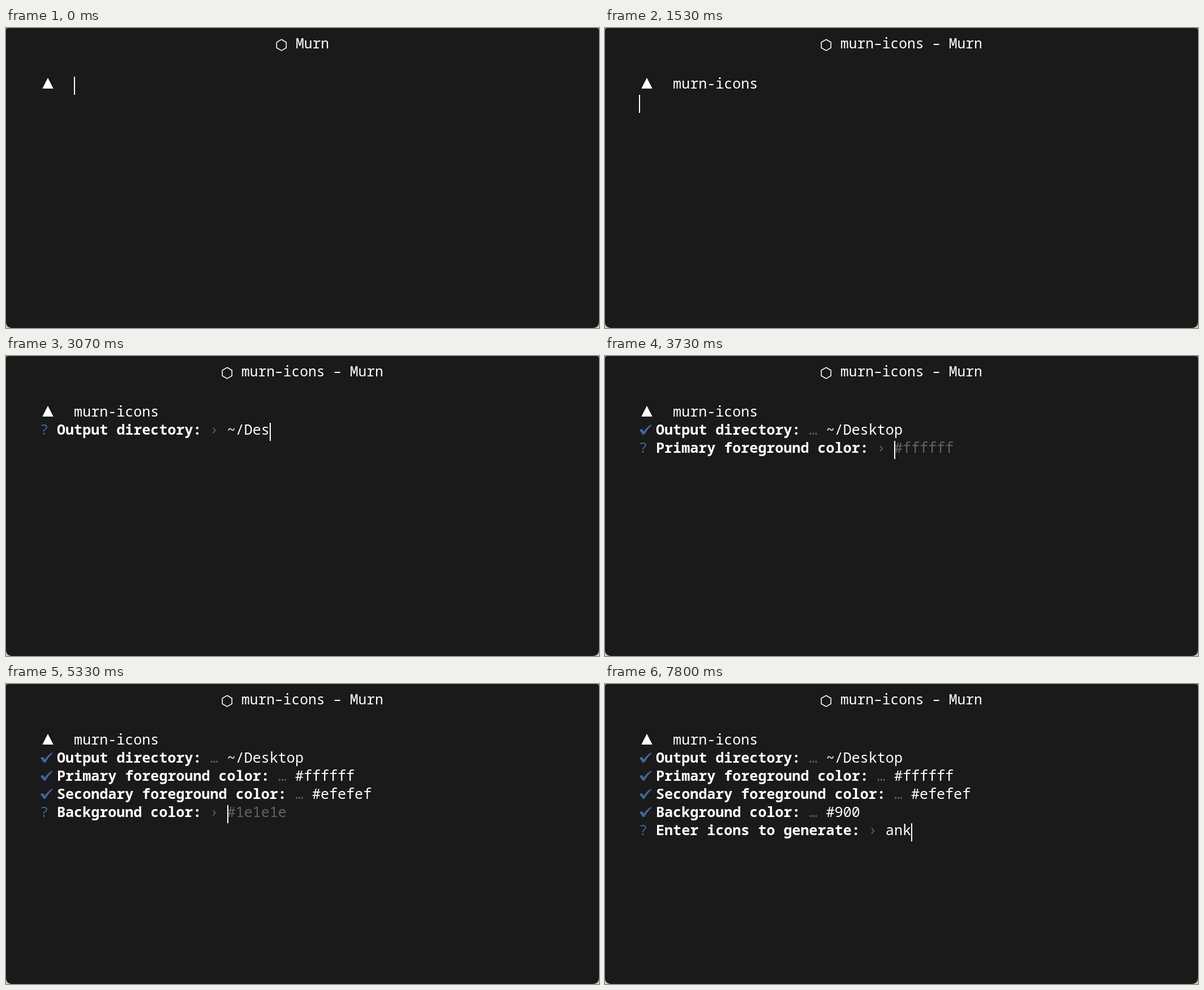
An HTML page with a canvas for the animation above (8 s loop, 1048x530 px).

```html
<!DOCTYPE html>
<html lang="en">
<head>
<meta charset="utf-8">
<title>Terminal</title>
<style>
  html, body { margin: 0; width: 100%; height: 100%; overflow: hidden; background: #1a1a1a; }
  canvas { display: block; }
</style>
</head>
<body>
<canvas id="stage" width="1048" height="530"></canvas>
<script>
const ctx = document.getElementById('stage').getContext('2d');
const LOOP = 8000;
const LEFT = 60, TOP = 86, CELL = 15.03, ROW = 32, BASELINE = 21;
const MONO = '"Noto Sans Mono", "DejaVu Sans Mono", monospace';
const BODY = `25.05px ${MONO}`;
const TITLE = `24.6px ${MONO}`;
const COLOR = { back: '#1a1a1a', corner: '#c4c4c4', text: '#fff', blue: '#41659c', dim: '#636363' };

// Each key list gives [time, characters visible from then on].
const command = {
  text: 'murn-icons', done: 1530,
  keys: [[470, 1], [560, 2], [640, 3], [730, 4], [870, 5],
         [1070, 6], [1160, 7], [1250, 8], [1340, 9], [1430, 10]]
};
const questions = [
  { label: 'Output directory:', hint: '.', text: '~/Desktop', start: 1730, done: 3670,
    keys: [[2470, 1], [2600, 2], [2800, 3], [2930, 4], [3070, 5],
           [3130, 6], [3220, 7], [3310, 8], [3400, 9]] },
  { label: 'Primary foreground color:', hint: '#ffffff', text: '#ffffff', start: 3730, done: 4530, keys: [] },
  { label: 'Secondary foreground color:', hint: '#efefef', text: '#efefef', start: 4530, done: 5330, keys: [] },
  { label: 'Background color:', hint: '#1e1e1e', text: '#900', start: 5330, done: 6800,
    keys: [[6070, 1], [6270, 2], [6400, 4]] },
  { label: 'Enter icons to generate:', hint: 'all', text: 'ank', start: 6800, done: Infinity,
    keys: [[7730, 2], [7800, 3]] }
];

const colX = col => LEFT + col * CELL;
const rowY = row => TOP + row * ROW;

function typed(field, time) {
  let count = 0;
  for (const [at, n] of field.keys) if (time >= at) count = n;
  return field.text.slice(0, count);
}

function write(text, col, row, color = COLOR.text, weight = 400) {
  ctx.font = `${weight} ${BODY}`;
  ctx.fillStyle = color;
  ctx.fillText(text, colX(col), rowY(row) + BASELINE);
}

function drawCursor(col, row) {
  ctx.fillStyle = COLOR.text;
  ctx.fillRect(Math.round(colX(col)), rowY(row), 2, ROW);
}

function drawTriangle() {
  ctx.fillStyle = COLOR.text;
  ctx.fill(new Path2D('M74 88 L83.7 107 H64.3 Z'));
}

function drawCheck(row) {
  ctx.save();
  ctx.translate(LEFT, rowY(row));
  ctx.fillStyle = COLOR.blue;
  ctx.fill(new Path2D('M1 13 Q3 10.5 5.5 11 Q7.5 12.5 8.5 15.5 Q14 7 21 3.5 L23 4 Q16 10 10.5 19.5 Q9 21.5 7 21 Q4 17 1 13 Z'));
  ctx.restore();
}

function drawHexagon(cx, cy, radius) {
  ctx.beginPath();
  for (let i = 0; i < 6; i++) {
    const angle = i * Math.PI / 3 - Math.PI / 2;
    ctx.lineTo(cx + radius * Math.cos(angle), cy + radius * Math.sin(angle));
  }
  ctx.closePath();
  ctx.strokeStyle = COLOR.text;
  ctx.lineWidth = 1.6;
  ctx.stroke();
}

function drawTitle(time) {
  const running = time >= command.done;
  const x = running ? 416 : 512;
  drawHexagon(x - 25.2, 30.1, 9.8);
  ctx.font = TITLE;
  ctx.fillStyle = COLOR.text;
  ctx.fillText(running ? 'murn–icons – Murn' : 'Murn', x, 36);
}

function drawQuestion(question, row, time) {
  const answered = time >= question.done;
  const sepCol = question.label.length + 3;
  const valueCol = sepCol + 2;
  if (answered) drawCheck(row);
  else write('?', 0, row, COLOR.blue);
  write(question.label, 2, row, COLOR.text, 700);
  write(answered ? '…' : '›', sepCol, row, COLOR.dim);
  if (answered) {
    write(question.text, valueCol, row);
    return 0;
  }
  const value = typed(question, time);
  write(value || question.hint, valueCol, row, value ? COLOR.text : COLOR.dim);
  return valueCol + value.length;
}

function draw(time) {
  ctx.fillStyle = COLOR.corner;
  ctx.fillRect(0, 0, 1048, 530);
  ctx.fillStyle = COLOR.back;
  ctx.beginPath();
  ctx.roundRect(0, 0, 1048, 530, [4, 4, 10, 10]);
  ctx.fill();

  drawTitle(time);
  drawTriangle();
  const entered = typed(command, time);
  write(entered, 4, 0);

  let cursorCol = 4 + entered.length, cursorRow = 0;
  if (time >= command.done) [cursorCol, cursorRow] = [0, 1];
  questions.forEach((question, i) => {
    if (time < question.start) return;
    const row = i + 1;
    cursorCol = drawQuestion(question, row, time);
    cursorRow = time >= question.done ? row + 1 : row;
  });
  drawCursor(cursorCol, cursorRow);
}

const begin = performance.now();
function tick() {
  draw((performance.now() - begin) % LOOP);
  requestAnimationFrame(tick);
}
tick();
</script>
</body>
</html>
```
